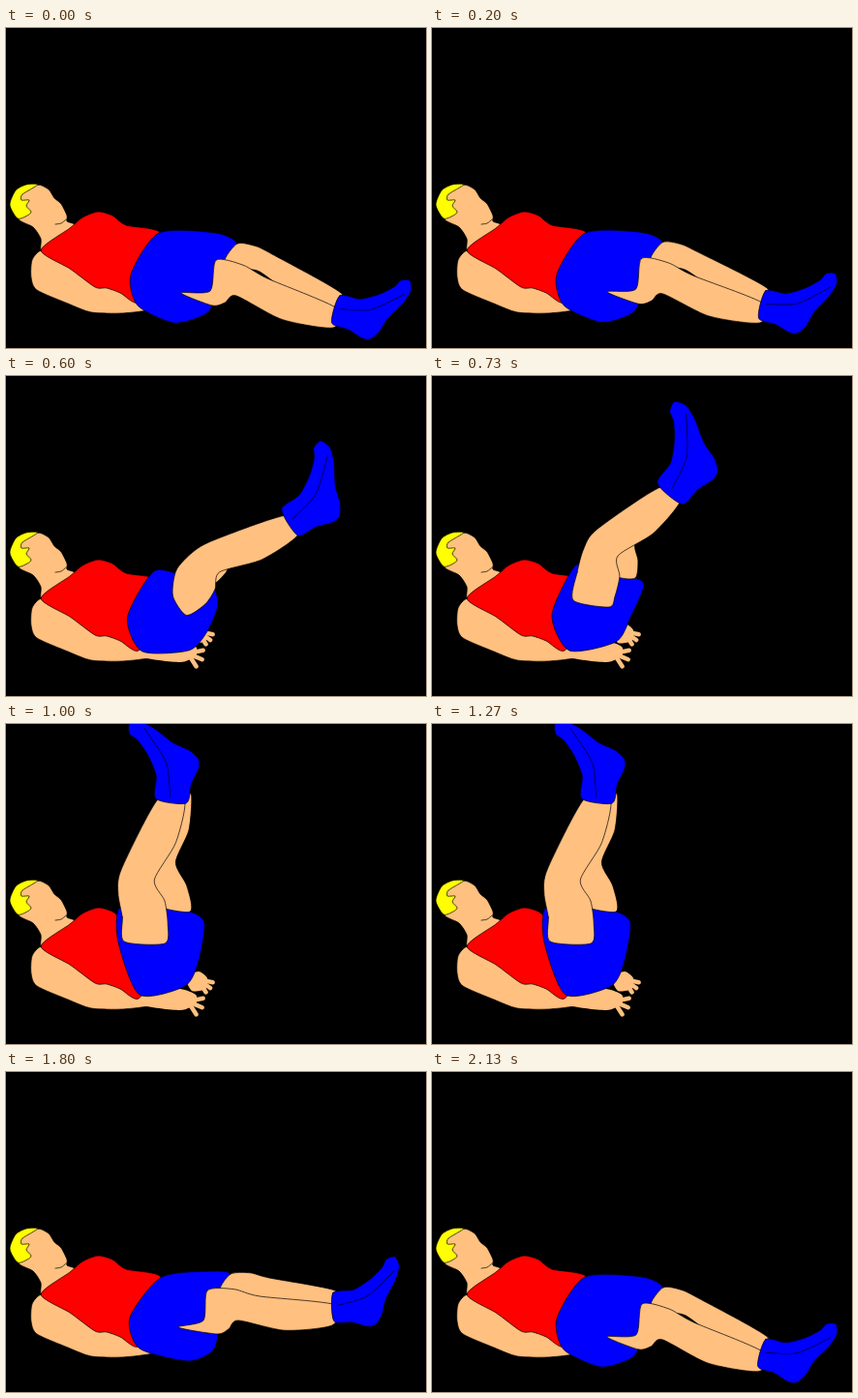
Write an HTML page with a canvas that moves like this. It is 434 by 331 pixels and loops after 2190 ms.

```html
<!DOCTYPE html>
<html lang="en">
<head>
<meta charset="utf-8">
<title>Leg raise</title>
<style>
html, body { margin: 0; width: 100%; height: 100%; overflow: hidden; background: #000; }
canvas { display: block; }
</style>
</head>
<body>
<canvas id="stage" width="434" height="331"></canvas>
<script>
const ctx = document.getElementById('stage').getContext('2d');
const SKIN = '#ffc080', RED = '#f00', BLUE = '#00f', YELLOW = '#ff0';
const LOOP = 2190, TICK = 200 / 3, TOP = 11;
const HIP = [180, 238];
const BOW = .08;

const pts = s => s.split(' ').map(p => p.split(',').map(Number));

// Upper body, which stays still
const head = pts('33,162 44,167 50,176 57,182 63,194 63,200 71,204 60,218 37,231 36,218 28,206 13,198 9,182 18,167');
const hair = pts('33,162 17,172 16,178 24,178 21,184 26,190 22,194 12,197 4,183 10,168 21,162');
const neck = pts('51,203 57,202 62,198');
const arm = pts('37,230 27,240 26,258 32,271 64,285 88,294 120,295 152,291 160,284 100,250 60,236');
const torso = pts('36,230 66,207 79,196 95,190 110,194 124,204 160,212 158,250 137,284 118,274 104,269 92,268 66,249');
const palm = pts('140,290 145,272 180,274 196,280 196,289 180,296');
const backPalm = pts('186,262 199,256 208,263 206,274 192,276');

// Joints at four key poses: lowered, level, raised, upright
const SWINGS = [0, .162, .687, 1];
// front hem, knee, ankle; back ankle, knee, hem; hem tip and corner
const nearJoints = [
  '217,240 270,259 342,290 338,310 238,277 213,287 181,274 211,272',
  '208,226 262,232 341,241 337,262 240,257 218,271 178,264 204,257',
  '150,203 170,159 236,115 257,128 192,186 189,228 183,239 146,232',
  '120,200 119,150 157,77 184,79 153,161 167,207 164,227 122,225'
].map(pts);
const farJoints = [
  '239,223 275,234 346,274 342,291 262,252 226,241',
  '232,209 272,213 340,226 341,241 262,235 221,226',
  '190,207 188,170 240,122 244,126 210,173 210,209',
  '150,187 146,160 180,80 191,73 175,143 190,194'
].map(pts);
// waist top, lap; three seat points; waist bottom and middle
const shortsPoints = [
  '158,212 217,212 213,287 202,298 173,305 136,287 129,255',
  '161,212 215,206 219,271 213,289 188,299 138,286 128,254',
  '148,196 165,206 219,217 205,250 190,275 142,284 124,247',
  '117,190 150,190 205,206 199,245 185,271 138,280 116,226'
].map(pts);
// ankle and toe
const footAxis = ['341,292 419,266', '339,244 405,195', '247,122 256,27', '171,79 131,-2'].map(pts);
// Foot outline with the ankle at 0,0 and the toe at 1,0
const foot = pts('.1,-.16 .33,-.04 .58,-.02 .79,-.05 .89,-.1 1,-.06 .97,.07 .83,.18 .59,.3 .43,.43 .3,.48 .2,.44 .07,.28 -.1,.13');
const footSeam = pts('.05,0 .42,.13 .88,.08');

const mix = (a, b, u) => a + (b - a) * u;
const smooth = x => x * x * x * (10 - 15 * x + 6 * x * x);
const legAngle = swing => mix(6, -101, swing) * Math.PI / 180;

function turn([x, y], a) {
  const c = Math.cos(a), s = Math.sin(a), dx = x - HIP[0], dy = y - HIP[1];
  return [HIP[0] + dx * c - dy * s, HIP[1] + dx * s + dy * c];
}

// Blend two key poses; legs are blended in axes that swing about the hip
function pose(keys, swing, angle = () => 0) {
  const i = swing < SWINGS[1] ? 0 : swing < SWINGS[2] ? 1 : 2;
  const u = (swing - SWINGS[i]) / (SWINGS[i + 1] - SWINGS[i]);
  return keys[i].map((p, n) => {
    const a = turn(p, -angle(SWINGS[i]));
    const b = turn(keys[i + 1][n], -angle(SWINGS[i + 1]));
    return turn([mix(a[0], b[0], u), mix(a[1], b[1], u)], angle(swing));
  });
}

// Midpoint pushed outwards, so that a muscle bulges
const bulge = (a, b, k = BOW) => [
  (a[0] + b[0]) / 2 + (b[1] - a[1]) * k,
  (a[1] + b[1]) / 2 - (b[0] - a[0]) * k
];

function leg([hip, knee, ankle, heel, hollow, hem, ...cuff]) {
  return [hip, bulge(hip, knee), knee, ankle, heel, bulge(heel, hollow), hollow, bulge(hollow, hem), hem, ...cuff];
}

function place(list, [from, to]) {
  const dx = to[0] - from[0], dy = to[1] - from[1];
  return list.map(([u, v]) => [from[0] + u * dx - v * dy, from[1] + u * dy + v * dx]);
}

function trace(list, closed) {
  const n = list.length, k = 1 / 8;
  const at = i => closed ? list[(i + n) % n] : list[Math.max(0, Math.min(n - 1, i))];
  ctx.beginPath();
  ctx.moveTo(...list[0]);
  for (let i = 0; i < (closed ? n : n - 1); i++) {
    const p = at(i - 1), q = at(i), r = at(i + 1), s = at(i + 2);
    ctx.bezierCurveTo(q[0] + (r[0] - p[0]) * k, q[1] + (r[1] - p[1]) * k,
      r[0] - (s[0] - q[0]) * k, r[1] - (s[1] - q[1]) * k, r[0], r[1]);
  }
  if (closed) ctx.closePath();
}

function shape(list, color, outlined = true) {
  trace(list, true);
  ctx.fillStyle = color;
  ctx.fill();
  if (outlined) ctx.stroke();
}

function line(list) {
  trace(list, false);
  ctx.stroke();
}

// Three fingers fanned out between two angles
function hand(outline, x, y, from, to) {
  shape(outline, SKIN, false);
  ctx.save();
  ctx.strokeStyle = SKIN;
  ctx.lineWidth = 4.5;
  for (let i = 0; i < 3; i++) {
    const a = mix(from, to, i / 2);
    line([[x, y], [x + 16 * Math.cos(a), y + 16 * Math.sin(a)]]);
  }
  ctx.restore();
}

function draw(time) {
  const tick = Math.floor((time % LOOP + 3.4) / TICK);
  const step = Math.floor(tick * 2 / 3 + .01);
  const k = TOP - Math.abs(TOP - step);
  const swing = smooth(Math.min(1, k / 10.5) ** 1.25);

  const near = pose(nearJoints, swing, legAngle);
  const far = pose(farJoints, swing, legAngle);
  const axis = pose(footAxis, swing, legAngle);
  const [waist, lap, ...seat] = pose(shortsPoints, swing);

  ctx.fillStyle = '#000';
  ctx.fillRect(0, 0, 434, 331);
  ctx.strokeStyle = '#000';
  ctx.lineWidth = .7;
  ctx.lineJoin = ctx.lineCap = 'round';

  shape(head, SKIN);
  shape(hair, YELLOW);
  line(neck);
  shape(arm, SKIN);
  if (swing > .2) {
    hand(backPalm, 198, 264, .2, 1);
    hand(palm, 188, 287, -.2, 1);
  }
  shape(torso, RED);
  shape([waist, lap, far[0], far[5], ...seat], BLUE);
  shape(leg(far), SKIN);
  shape(leg(near), SKIN);
  shape(place(foot, axis), BLUE);
  line(place(footSeam, axis));
}

const start = performance.now();
function loop() {
  draw(performance.now() - start);
  requestAnimationFrame(loop);
}
loop();
</script>
</body>
</html>
```
